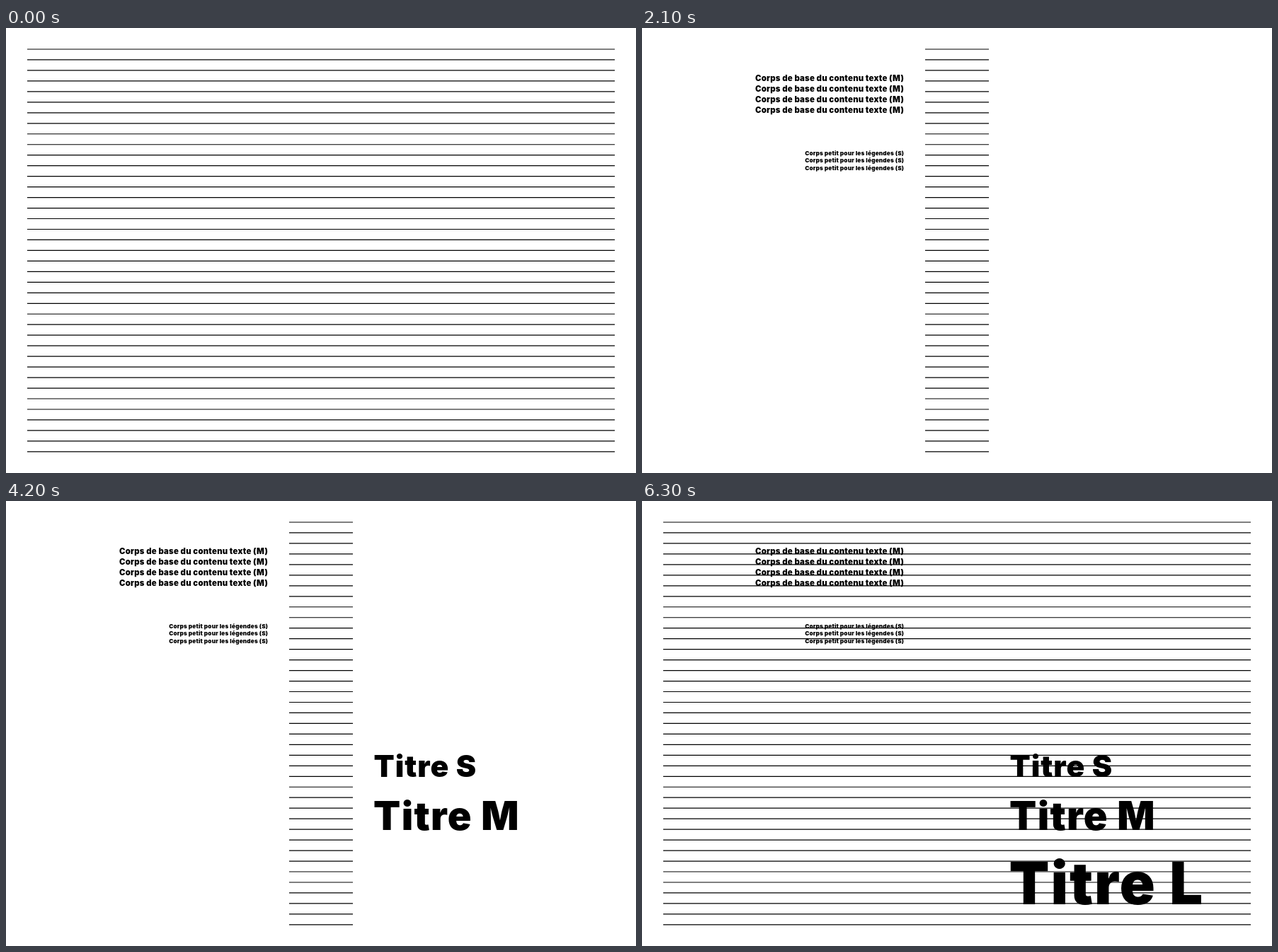
These frames come from a looping animation (890 px wide and 629 px high, 7.35 s). An HTML page:

```html
<!DOCTYPE html>
<html lang="fr">
<head>
<meta charset="utf-8">
<style>
  html, body { margin: 0; height: 100%; overflow: hidden; background: #fff; }
  svg { display: block; width: 890px; height: 629px; }
  text { font-family: Inter, "Liberation Sans", Arial, sans-serif; font-weight: 900; font-optical-sizing: none; letter-spacing: .024em; }
  path { stroke: #000; stroke-width: 1.2; }
</style>
</head>
<body>
<svg viewBox="0 0 890 629"><path id="rules"/></svg>
<script>
const STEP = 1050, STEPS = 7;
const svg = document.querySelector('svg');
const rules = document.getElementById('rules');
const texts = [];

function addText(content, x, y, size, anchor, from) {
  const node = document.createElementNS('http://www.w3.org/2000/svg', 'text');
  node.textContent = content;
  const attributes = { x, y, 'font-size': size, 'text-anchor': anchor };
  for (const name in attributes) node.setAttribute(name, attributes[name]);
  svg.append(node);
  texts.push({ node, from });
}

const addTitle = (content, y, size, from) =>
  addText(content, 520.5 - size * .025, y, size, 'start', from);

function rulePath(left, right) {
  let d = '';
  for (let i = 0; i < 39; i++) d += `M${left} ${30 + i * 14.97}H${right}`;
  return d;
}

for (let i = 0; i < 4; i++)
  addText('Corps de base du contenu texte (M)', 370.2, 74.6 + i * 14.97, 11.3, 'end', 1);
for (let i = 0; i < 3; i++)
  addText('Corps petit pour les légendes (S)', 370.2, 179.6 + i * 10.5, 8.2, 'end', 2);
addTitle('Titre S', 389.8, 42.6, 3);
addTitle('Titre M', 464.8, 55.7, 4);
addTitle('Titre L', 569.6, 83, 5);

const wide = rulePath(30, 860), narrow = rulePath(400, 490);
let shown = -1;

function draw() {
  const step = Math.floor(performance.now() / STEP) % STEPS;
  if (step !== shown) {
    shown = step;
    rules.setAttribute('d', step === 0 || step === STEPS - 1 ? wide : narrow);
    for (const { node, from } of texts)
      node.setAttribute('visibility', step >= from ? 'visible' : 'hidden');
  }
  requestAnimationFrame(draw);
}
draw();
</script>
</body>
</html>
```
